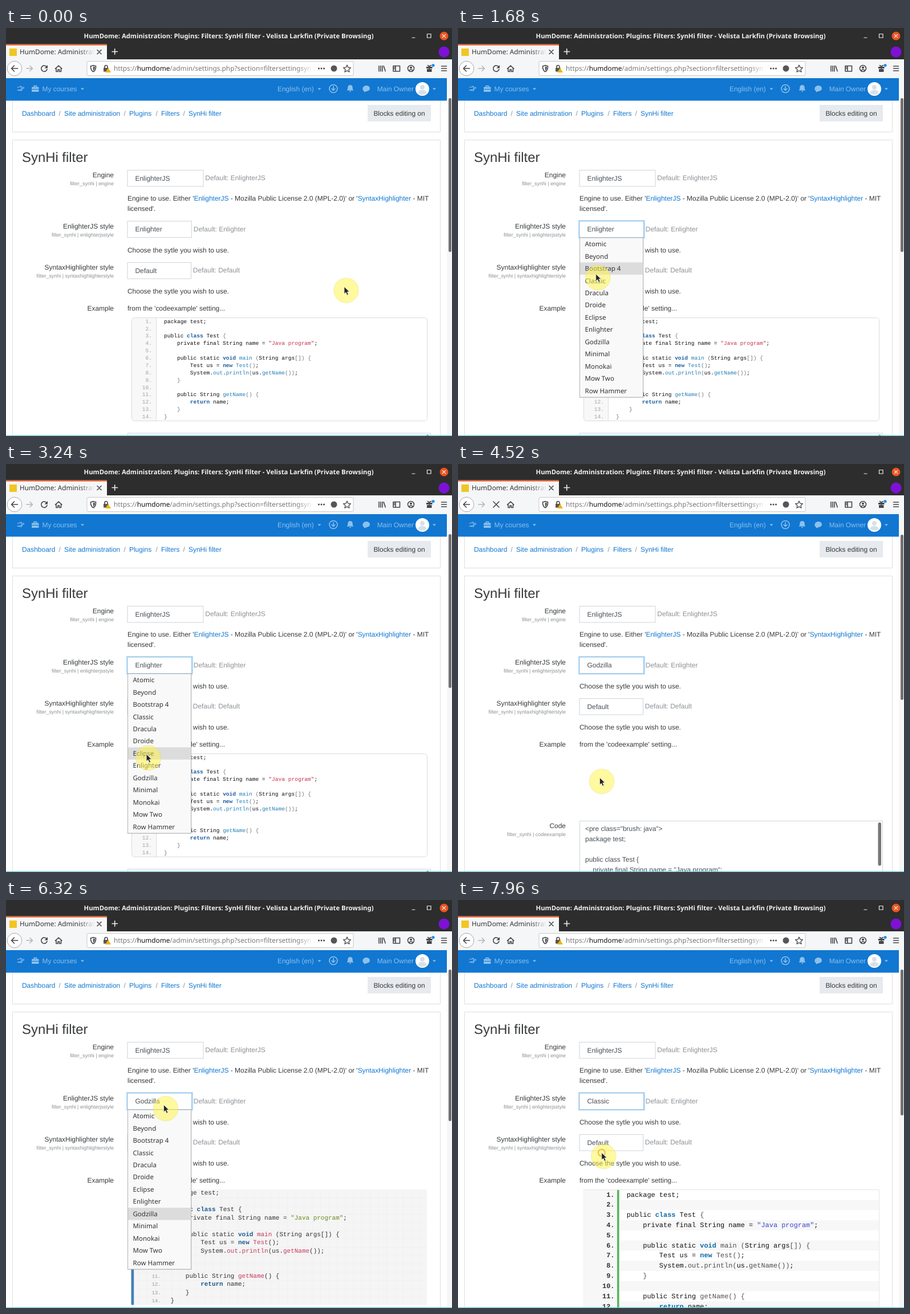
An HTML page for the animation above (8000 ms loop, 782x716 px).

```html
<!DOCTYPE html>
<html lang="en">
<head>
<meta charset="utf-8">
<title>SynHi filter</title>
<style>
html, body { margin: 0; width: 100%; height: 100%; overflow: hidden; background: #fff; }
svg { display: block; width: 782px; height: 716px; }
text { font: 11.95px "Liberation Sans", Arial, sans-serif; fill: #373a3c; white-space: pre; text-rendering: geometricPrecision; }
.ui { font: 11.8px "Noto Sans", sans-serif; fill: #333; }
.title { font: bold 11.3px "Noto Sans", sans-serif; fill: #f2f2f2; }
.heading { font-size: 23.9px; }
.small { font-size: 8.95px; fill: #8a8f94; }
.grey { fill: #8c9196; }
.link { fill: #1177d1; }
.nav { fill: #8cc0ec; }
.field { fill: #495057; }
.item { font-size: 11.5px; }
.end { text-anchor: end; }
.mid { text-anchor: middle; }
.icon { fill: none; stroke: #45454a; stroke-width: 1.6; stroke-linecap: round; stroke-linejoin: round; }
.code text { font-family: "Liberation Mono", monospace; fill: #111; }
.code .k { font-weight: bold; }
#enlighter text { font-size: 9.55px; }
#enlighter .num { fill: #a3a3a3; }
#enlighter .k { fill: #1f5f9f; }
#enlighter .f { fill: #2480b8; }
#enlighter .s { fill: #c9304f; }
#enlighter .p { fill: #777; }
#godzilla text { font-size: 10.97px; fill: #333; }
#godzilla .num { font-size: 8.8px; fill: #999; }
#godzilla .k { fill: #1b5a92; }
#godzilla .f { fill: #c8385c; }
#godzilla .s { fill: #6b8c1f; }
#classic text { font-size: 11.92px; }
#classic .num { font-weight: bold; fill: #333; }
#classic .k { fill: #0f69a8; }
#classic .f, #classic .p { fill: #505050; }
#classic .s { fill: #3d48d0; }
</style>
</head>
<body>
<svg id="stage" viewBox="0 0 782 716"></svg>
<script>
const escapeText = s => s.replace(/&/g, '&amp;').replace(/</g, '&lt;');
const text = (x, y, s, cls = '') => `<text x="${x}" y="${y}" class="${cls}">${s}</text>`;
const rect = (x, y, w, h, fill, more = '') =>
  `<rect x="${x}" y="${y}" width="${w}" height="${h}" fill="${fill}" ${more}/>`;
const circle = (x, y, r, fill, more = '') => `<circle cx="${x}" cy="${y}" r="${r}" fill="${fill}" ${more}/>`;
const icon = (d, more = '') => `<path class="icon" d="${d}" ${more}/>`;
const shape = (d, fill, more = '') => `<path d="${d}" fill="${fill}" ${more}/>`;
const group = (id, content, more = '') => `<g id="${id}" ${more}>${content}</g>`;
const caret = (x, y) => shape(`M${x - 3} ${y - 1.5}h6l-3 3.2z`, '#8cc0ec');
const border = 'stroke="#ced4da"';

const program = `package test;

public class Test {
    private final String name = "Java program";

    public static void main (String args[]) {
        Test us = new Test();
        System.out.println(us.getName());
    }

    public String getName() {
        return name;
    }
}`.split('\n');

const tokens = /("[^"]*")|\b(class|void|new|return)\b|((?<=\.)\w+|\w+(?= ?\())|([(){}[\]]+)/g;
const paint = line => line.replace(tokens, (m, s, k, f) =>
  `<tspan class="${s ? 's' : k ? 'k' : f ? 'f' : 'p'}">${m}</tspan>`);
const listing = (x, numberX, y, step) => program.map((line, i) =>
  text(numberX, y + i * step, `${i + 1}.`, 'num end') + text(x, y + i * step, paint(line))).join('');

function browser() {
  const address = '<tspan fill="#777">https://</tspan><tspan fill="#111">humdome</tspan>' +
    '<tspan fill="#777">/admin/settings.php?section=filtersettingsyn</tspan>';
  return rect(0, 0, 782, 56, '#2d2d2d') +
    text(390.5, 18, 'HumDome: Administration: Plugins: Filters: SynHi filter - Velista Larkfin (Private Browsing)', 'title mid') +
    icon('M712 17h5M738.5 10.5h6.5v6.5h-6.5z', 'style="stroke:#eee;stroke-width:1.2"') +
    circle(768, 14, 7.5, '#e95420') + icon('M765.3 11.3l5.4 5.4m0-5.4l-5.4 5.4', 'style="stroke:#fff;stroke-width:1.2"') +
    rect(0, 28.5, 177, 27, '#f5f6f7') + rect(0, 28.5, 177, 2, '#e95420') +
    rect(6, 36, 13, 13, '#f2c522') +
    text(24, 46, 'HumDome: Administrati', 'ui') + rect(128, 34, 32, 18, 'url(#tabFade)') +
    icon('M160 38.5l7 7m0-7l-7 7') +
    icon('M186 41.5h9.5M190.7 36.8v9.5', 'style="stroke:#eee"') +
    circle(768, 42, 9.5, '#7d12d6') +
    rect(0, 55, 782, 33, '#f5f6f7') +
    circle(15, 71, 12.8, '#fff', 'stroke="#aaa"') +
    icon('M20.5 71h-11m5-5l-5 5l5 5') +
    icon('M36 71h10.5m-4.5-4.5l4.5 4.5l-4.5 4.5', 'style="stroke:#b5b5b8"') +
    group('reload', icon('M71.3 68.2a5.2 5.2 0 1 0 .7 4.3') + shape('M73 65v5.5h-5.5z', '#45454a')) +
    group('stop', icon('M62 66l10 10m0-10l-10 10')) +
    icon('M86.5 71.3l5.7-5.3l5.7 5.3M88 71v5.5h3v-3.5h2.5v3.5h3v-5.5') +
    rect(142, 58.5, 467, 25, '#fff', 'rx="2" stroke="#c9c9cc"') +
    icon('M153 65.5c2 1 3.500 1.300 4.600 1.300c0 5-1.500 8.500-4.600 10c-3.100-1.500-4.600-5-4.600-10c1.100 0 2.600-.3 4.600-1.300z') + shape('M153 67.5v7.5c2-1.500 2.800-4 2.800-6.600z', '#45454a') +
    rect(171, 70, 9, 6.5, '#55555a') + icon('M173 70v-2a2.5 2.5 0 0 1 5 0v2') + shape('M179 70l5 8h-10z', '#f0b400') +
    text(189, 75, address, 'ui') + rect(510, 61, 35, 20, 'url(#urlFade)') +
    [548.5, 553, 557.5].map(x => circle(x, 71, 1.5, '#45454a')).join('') +
    circle(575, 71, 5.5, '#55555a') +
    icon('M598 65l1.9 4.2l4.5.5l-3.4 3l1 4.5l-4-2.3l-4 2.3l1-4.5l-3.4-3l4.5-.5z', 'style="stroke-width:1.3"') +
    icon('M654 66.5v9.5M657 66.5v9.5M660 66.5v9.5M662.2 66.8l3 9') +
    icon('M679 66.5h11.5v9.5h-11.5zM683 66.5v9.5M680.5 69h1M680.5 71.5h1') +
    icon('M715.5 71a5.5 5.5 0 1 0-11 0a5.5 5.5 0 1 0 11 0M707 74.5c1.2-2 4.8-2 6 0') + circle(710, 69.5, 2, '#45454a') +
    rect(737, 68, 10.5, 3, '#45454a') + rect(738, 72, 8.5, 5, '#45454a') + icon('M742.3 68v8M739.5 65.5l2.8 2l2.8-2') + circle(749, 65.5, 2.6, '#1e90f0') +
    icon('M763.5 67h9M763.5 71h9M763.5 75h9');
}

function navbar() {
  return rect(0, 88, 773, 39.5, '#1177d1') +
    icon('M20 104h3c1-1.500 2-2 3-2c1 0 1 1 0 2h4.500c1.200 0 1.200 2 0 2h-4M27.500 106c1.300 0 1.300 2-.3 2M27 108c1 0 1 2-.5 2h-1.500c-2 0-2.500-1-5-1z', 'style="stroke:#8cc0ec;stroke-width:1.2"') +
    rect(45, 103.5, 12.5, 8.5, '#8cc0ec', 'rx="1"') + icon('M49 103v-1.5h4.5v1.5', 'style="stroke:#8cc0ec"') + rect(45, 107, 12.5, 1, '#1177d1') +
    text(63.5, 111, 'My courses', 'nav') + caret(134, 107) +
    text(476, 110.5, 'English (en)', 'nav') + caret(549.5, 107) +
    icon('M581 106.5a7 7 0 1 0-14 0a7 7 0 1 0 14 0M574 102.5v7m-3-3l3 3l3-3', 'style="stroke:#8cc0ec"') +
    shape('M597.5 109.5c2-1.500 1.500-4 2-6.500c.5-4 7.500-4 8 0c.5 2.500 0 5 2 6.500zM602 110.5h3.200c-.5 2-2.700 2-3.200 0z', '#8cc0ec') +
    shape('M628 111c-5-3-2.500-10 4-10c7 0 8.500 9 1 9.700c-1 0-2 1.300-5.500 1.800z', '#8cc0ec') +
    text(715, 110.5, 'Main Owner', 'nav end') + circle(730, 107, 12, '#fff') +
    circle(730, 104, 4, '#d8e0e8') + shape('M722.5 114c0-7 15-7 15 0c-4 4-11 4-15 0z', '#d8e0e8') + caret(751, 107);
}

function setting(y, name, key) {
  return text(189, y + 4, name, 'end') + (key ? text(189, y + 18, `filter_synhi | ${key}`, 'small end') : '');
}

function select(y, width, value, fallback, id) {
  return rect(213, y, width, 28.5, '#fff', `id="${id}Box" ${border}`) +
    `<text id="${id}" class="field" x="226.5" y="${Math.floor(y + 18.5)}">${value}</text>` +
    text(216.3 + width, Math.floor(y + 18), `Default: ${fallback}`, 'grey');
}

function page() {
  const crumbs = [[28, 'Dashboard'], [102, 'Site administration'], [216, 'Plugins'], [272, 'Filters'], [320, 'SynHi filter']];
  const hint = 'Choose the sytle you wish to use.';
  return rect(11.5, 100, 750, 82.5, '#fff', 'stroke="#dfdfdf"') + rect(11.5, 196.5, 750, 560, '#fff', 'stroke="#dfdfdf"') +
    crumbs.map(([x, s], i) => text(x, 154, s, 'link') + (i ? text(x - 9.5, 154, '/', 'grey') : '')).join('') +
    rect(634, 135, 111, 29, '#e7eaee') + text(689.5, 154, 'Blocks editing on', 'mid') +
    text(28, 235.3, 'SynHi filter', 'heading') +
    setting(258, 'Engine', 'engine') + setting(348, 'EnlighterJS style', 'enlighterjsstyle') +
    setting(420, 'SyntaxHighlighter style', 'syntaxhighlighterstyle') + setting(492, 'Example') +
    select(249.5, 133, 'EnlighterJS', 'EnlighterJS', 'engine') +
    rect(211, 337, 117, 32.5, '#b9dbf5', 'id="focus" rx="1"') +
    select(339, 112.5, 'Enlighter', 'Enlighter', 'style') + select(411.5, 111.5, 'Default', 'Default', 'syntax') +
    text(213, 303, `Engine to use. Either '<tspan class="link">EnlighterJS</tspan> - Mozilla Public License 2.0 (MPL-2.0)' or '<tspan class="link">SyntaxHighlighter</tspan> - MIT`) +
    text(213, 321, "licensed'.") + text(213, 394, hint) + text(213, 466, hint) +
    text(213, 496, "from the 'codeexample' setting...");
}

function examples() {
  const stripes = program.map((_, i) => i % 2 ? rect(283, 508.5 + i * 17.8, 455, 17.8, '#f7f7f7') : '').join('');
  return group('enlighter', rect(220.5, 508.5, 518, 181, '#fff', 'rx="5"') +
      shape('M263.5 509h-38a5 5 0 0 0-5 5v170a5 5 0 0 0 5 5h38z', '#f8f8f8') + rect(263, 509, 1, 180, '#dedede') +
      rect(220.5, 508.5, 518, 181, 'none', 'rx="5" stroke="#dcdcdc"') + listing(277, 256, 517.7, 12.87), 'class="code"') +
    group('godzilla', rect(220, 508, 518, 202.5, '#f5f5f5') + rect(220, 508, 518, 202.5, 'url(#grid)') +
      rect(219.5, 508, 4.7, 202.5, '#457fb5') + listing(288.5, 271.5, 517.2, 14.53), 'class="code"') +
    group('classic', rect(220.5, 508.5, 518, 260, '#fff', 'stroke="#e6e6e6"') + stripes + rect(220.5, 509, 59, 260, '#f7f7f7') +
      rect(279, 509, 3.6, 260, '#58b65c') + listing(295.7, 274.5, 520.5, 17.82), 'class="code"');
}

function codeField() {
  const lines = ['<pre class="brush: java">', ...program];
  return group('field', setting(635, 'Code', 'codeexample') + rect(213.5, 626.5, 531, 180, '#fff', border) +
    lines.slice(0, 6).map((s, i) => text(223, 644 + i * 18, escapeText(s), 'field')).join('') +
    rect(736.5, 629, 5.5, 76, '#77777a', 'rx="2.7"'));
}

const styles = ['Atomic', 'Beyond', 'Bootstrap 4', 'Classic', 'Dracula', 'Droide', 'Eclipse',
  'Enlighter', 'Godzilla', 'Minimal', 'Monokai', 'Mow Two', 'Row Hammer'];
const menuTop = 368.5, rowHeight = 21.45;
const menu = () => group('menu', rect(213, 368, 112.5, 281, '#00000022', 'rx="1"') +
  rect(213.5, 368, 111, 280, '#f9f9f9', 'stroke="#b4b4b4"') + rect(214, 0, 110.5, rowHeight, '#dcdcdc', 'id="hover"') +
  styles.map((s, i) => text(222.5, 383.2 + i * rowHeight, s, 'ui item')).join(''));

const pointer = () => group('pointer', circle(0, 0, 21.8, '#fff54a', 'opacity=".52" stroke="#e6d64a" stroke-width=".8"') +
  circle(-3.5, -6.5, 6, 'none', 'id="ring" stroke="#eda12c" stroke-width="2" opacity=".7"') +
  shape('M-3.5-6.5v12.5l2.9-2.6l2.2 4.8l2.3-1l-2.2-4.7h4z', '#222', 'id="arrow" stroke="#fff" stroke-width=".7"') +
  group('beam', icon('M-2.5-6c1.500 0 2.500.5 2.500 1.500v9c0 1-1 1.500-2.500 1.500M2.5-6c-1.500 0-2.500.5-2.500 1.500M0 4.5c0 1 1 1.500 2.500 1.500', 'style="stroke:#222;stroke-width:1.2"')));

const fade = (id, color) => `<linearGradient id="${id}"><stop stop-color="${color}" stop-opacity="0"/><stop offset=".85" stop-color="${color}"/></linearGradient>`;
const defs = `<defs>${fade('tabFade', '#f5f6f7')}${fade('urlFade', '#fff')}
  <pattern id="grid" width="14.5" height="14.5" patternUnits="userSpaceOnUse"><path d="M0 .5h14.5M.5 0v14.5" stroke="#f0f0f0"/></pattern></defs>`;

document.getElementById('stage').innerHTML = defs + rect(0, 0, 782, 716, '#fff') + page() + examples() + codeField() +
  navbar() + rect(773, 88, 9, 628, '#f6f6f6') + rect(776, 123, 5, 270, '#717174', 'id="thumb" rx="2.5"') +
  browser() + menu() + rect(0, 714.7, 782, 1.3, '#62cfd6') + pointer();

const el = id => document.getElementById(id);
const set = (id, values) => Object.entries(values).forEach(([k, v]) => el(id).setAttribute(k, v));
const show = (id, on) => { el(id).style.display = on ? '' : 'none'; };
const within = (t, a, b) => t >= a && t < b;

// time, x, y of the pointer
const path = [[0, 596.5, 460.5], [40, 596.5, 460.5], [800, 242, 358.5], [1480, 242, 358.5], [1720, 245.5, 444.5],
  [2240, 246.5, 461.5], [2760, 246.5, 461.5], [3640, 252, 557], [4840, 252, 557], [5520, 287, 374],
  [5680, 280, 366], [6440, 280, 366], [7080, 255.3, 450], [8000, 255.3, 450]];

function pointerAt(t) {
  const i = path.findIndex(p => p[0] > t), [t0, x0, y0] = path[i - 1], [t1, x1, y1] = path[i];
  const u = (t - t0) / (t1 - t0), e = u * u * (3 - 2 * u);
  return [x0 + (x1 - x0) * e, y0 + (y1 - y0) * e];
}

// example shown: thumb top, thumb height, code field offset
const layouts = {
  enlighter: [123, 270, 84.5], blank: [124, 290, 0], godzilla: [122, 266, 105.5], classic: [122, 256, 160]
};
const clicks = [880, 3880, 5760, 7560];

function draw(t) {
  const example = t < 4400 ? 'enlighter' : t < 4600 ? 'blank' : t < 7800 ? 'godzilla' : t < 7920 ? 'blank' : 'classic';
  const [thumbY, thumbHeight, offset] = layouts[example];
  ['enlighter', 'godzilla', 'classic'].forEach(id => show(id, id === example));
  set('thumb', { y: thumbY, height: thumbHeight });
  set('field', { transform: `translate(0 ${offset})` });

  const loading = within(t, 3920, 4640) || within(t, 7600, 7920);
  show('stop', loading);
  show('reload', !loading);

  const value = t < 3880 ? 'Enlighter' : t < 7560 ? 'Godzilla' : 'Classic';
  el('style').textContent = value;
  show('focus', t >= 880);
  set('styleBox', { stroke: t >= 880 ? '#93c3e8' : '#ced4da' });

  const [x, y] = pointerAt(t);
  const open = within(t, 960, 3880) || within(t, 5880, 7560);
  const row = Math.floor((y - 6.5 - menuTop) / rowHeight);
  show('menu', open);
  set('hover', { y: menuTop + (row < 0 ? styles.indexOf(value) : row) * rowHeight });

  const overText = !open && x > 213 && x < 391 && [[390, 10], [462, 8], [492, 8]].some(([c, r]) => Math.abs(y - c) < r);
  show('beam', overText);
  show('arrow', !overText);
  const click = clicks.find(c => within(t, c, c + 440));
  show('ring', click !== undefined);
  if (click !== undefined) set('ring', { r: Math.min(6, 2 + (t - click) / 50) });
  set('pointer', { transform: `translate(${x} ${y})` });
}

function tick() {
  const t = performance.now() % 8000;
  draw(t - t % 40);
  requestAnimationFrame(tick);
}
tick();
</script>
</body>
</html>
```
